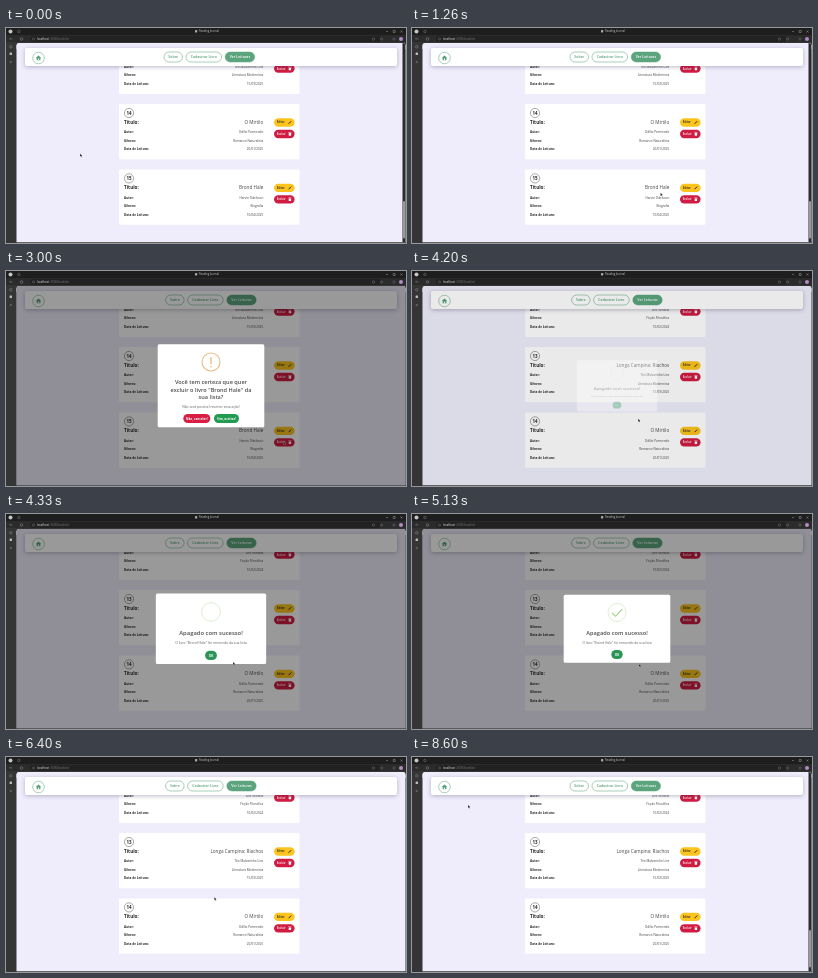
Write an HTML page with a canvas that moves like this. It is 400 px wide and 215 px high and loops after 8670 ms.

```html
<!DOCTYPE html>
<html lang="pt-BR">
<head>
<meta charset="utf-8">
<title>Reading Journal</title>
<style>
html, body { margin: 0; width: 100%; height: 100%; overflow: hidden; background: #1f1f1f; }
canvas { display: block; width: 400px; height: 215px; }
</style>
</head>
<body>
<canvas id="stage"></canvas>
<script>
const LOOP = 8670;
const canvas = document.getElementById('stage');
const ctx = canvas.getContext('2d');
const dpr = window.devicePixelRatio || 1;
canvas.width = 400 * dpr;
canvas.height = 215 * dpr;

const GREEN = '#519f74', RED = '#d01c43', INK = '#26262a', PAGE = '#efedfc';
const REMOVED = 'Brond Hale';
const BOOKS = [
  [12, 'A Colina', 'Ciro Ventolo', 'Ficção Filosófica', '10/02/2024'],
  [13, 'Longa Campina: Riachos', 'Téo Malvarinho Lins', 'Literatura Modernista', '15/03/2025'],
  [14, 'O Mirtilo', 'Odílio Parmendo', 'Romance Naturalista', '20/01/2025'],
  [15, REMOVED, 'Harvin Odelsson', 'Biografia', '10/04/2025']
];

// Event times in ms; the page scroll is locked from LOCK to RESTORED
const LOCK = 2400, ASK = 2440, ASK_END = 4010, DELETED = 4130, DONE = 4180, DONE_END = 6268, RESTORED = 7260;
// Pointer stops: time, x, y
const PATH = [
  [60, 74, 125.7], [800, 170, 150], [1500, 277.5, 170.3], [3050, 277.5, 170.3], [3900, 223, 147],
  [4330, 227, 148], [5100, 227, 150], [5930, 207, 140], [6330, 207.5, 140.5], [6400, 208.3, 140.2],
  [7260, 208.3, 140.2], [8130, 39, 31], [8600, 56, 48]
];

const clamp = v => Math.max(0, Math.min(1, v));
const progress = (t, start, length) => clamp((t - start) / length);
const mix = (a, b, p) => a + (b - a) * p;

function text(str, x, y, size, color, align = 'left', weight = 400) {
  ctx.save();
  ctx.translate(x, y + size * 0.36);
  ctx.scale(0.1, 0.1); // lay out large so glyph spacing stays fractional
  ctx.font = `${weight} ${size * 10}px "Open Sans", "Noto Sans", sans-serif`;
  ctx.textAlign = align;
  ctx.fillStyle = color;
  ctx.fillText(str, 0, 0);
  ctx.restore();
}

function box(x, y, w, h, r, fill, stroke, width = 0.7) {
  ctx.beginPath();
  ctx.roundRect(x, y, w, h, r);
  paint(fill, stroke, width);
}

function circle(x, y, r, fill, stroke, width = 0.7) {
  ctx.beginPath();
  ctx.arc(x, y, r, 0, 7);
  paint(fill, stroke, width);
}

function paint(fill, stroke, width) {
  if (fill) { ctx.fillStyle = fill; ctx.fill(); }
  if (stroke) { ctx.strokeStyle = stroke; ctx.lineWidth = width; ctx.stroke(); }
}

function line(points, color, width = 0.6) {
  ctx.beginPath();
  points.forEach(p => ctx.lineTo(...p));
  paint(null, color, width);
}

function shape(points, fill, stroke, width) {
  ctx.beginPath();
  points.forEach(p => ctx.lineTo(...p));
  ctx.closePath();
  paint(fill, stroke, width);
}

function shadow(color, blur, dy, draw) {
  ctx.save();
  ctx.shadowColor = color;
  ctx.shadowBlur = blur * dpr;
  ctx.shadowOffsetY = dy * dpr;
  draw();
  ctx.restore();
}

function viewport() {
  ctx.beginPath();
  ctx.roundRect(10.5, 15, 389, 199.3, [3, 3, 0, 0]);
}

function browser() {
  box(0, 0, 400, 215, 0, '#1e1e1e');
  box(0, 7, 400, 8, 0, '#2b2b2b');
  box(0, 14, 400, 201, 0, '#353535');
  box(24, 8, 351, 6, 3, '#222');
  circle(4.5, 3.5, 2, '#c5c5c5');
  box(11.8, 2.4, 2.2, 2.2, 0.5, null, '#999', 0.4);
  box(189, 2, 2.2, 2.4, 0.4, '#aaa');
  text('Reading Journal', 193, 3.3, 2.7, '#c8c8c8');
  line([[380, 3.5], [382, 3.5]], '#bbb', 0.4);
  box(387.2, 2.5, 2, 2, 0, null, '#bbb', 0.4);
  line([[394.5, 2.5], [396.5, 4.5]], '#bbb', 0.4);
  line([[396.5, 2.5], [394.5, 4.5]], '#bbb', 0.4);
  line([[6.5, 11], [3.5, 11], [4.8, 9.7]], '#aaa', 0.4);
  circle(15.5, 11, 1.3, null, '#aaa', 0.4);
  circle(27.5, 11, 1.1, null, '#888', 0.4);
  text('localhost', 31, 11, 2.9, '#e4e4e4');
  text(':3000/booklist', 43.8, 11, 2.9, '#777');
  circle(367.5, 11, 1.2, null, '#888', 0.4);
  box(374.5, 10, 2, 2, 0.5, null, '#888', 0.4);
  box(387, 10, 2, 2, 0.5, null, '#888', 0.4);
  circle(395, 11, 2, '#b38bc4');
  box(3.7, 17.7, 2.2, 2.2, 0.5, null, '#aaa', 0.4);
  box(3.6, 24.5, 2.4, 2.4, 0.5, '#bbb');
  line([[3.6, 34], [6, 34]], '#999', 0.4);
  line([[4.8, 32.8], [4.8, 35.2]], '#999', 0.4);
}

function pill(y, label, fill, ink) {
  box(268, y - 4.2, 20.6, 8.4, 4.2, fill);
  text(label, 270.8, y, 2.75, ink, 'left', 600);
}

function card(top, [number, title, author, genre, date], hover) {
  box(113, top, 180.5, 55.3, 1, '#fff');
  circle(123, top + 9, 4.6, '#fff', '#444', 0.45);
  text(number, 123, top + 9, 4.5, INK, 'center', 700);
  const rows = [['Título:', title, 18.4, 4.65], ['Autor:', author, 28, 3.1],
    ['Gênero:', genre, 36.4, 3.1], ['Data de Leitura:', date, 45, 3.1]];
  for (const [label, value, dy, size] of rows) {
    text(label, 118, top + dy, size, INK, 'left', 700);
    text(value, 257.3, top + dy, size, '#444', 'right');
  }
  const editY = top + 18.5, deleteY = top + 30;
  pill(editY, 'Editar', '#fcc41c', INK);
  line([[282.6, editY + 1.3], [285.2, editY - 1.3]], INK, 1);
  pill(deleteY, 'Excluir', hover ? '#981c35' : RED, '#fff');
  box(282.7, deleteY - 0.9, 2.4, 2.6, 0.4, '#fff');
  line([[282.2, deleteY - 1.6], [285.6, deleteY - 1.6]], '#fff', 0.5);
}

function navButton(x, w, label, active) {
  box(x, 24, w, 10, 5, active ? '#5ba47d' : '#fff', active ? '#5ba47d' : GREEN, 0.5);
  text(label, x + w / 2, 29, 3.55, active ? '#fff' : GREEN, 'center', 600);
}

function navbar(shift) {
  box(10, 15, 390, 6, 0, PAGE); // nothing scrolls past above the bar
  shadow('rgba(30,25,60,.3)', 4, 0.9, () => box(19, 20, 372, 18, 2, '#fff'));
  circle(32.5, 30, 5.8, '#fff', GREEN, 0.5);
  shape([[29.8, 30.1], [32.5, 27.6], [35.2, 30.1], [34.4, 30.1], [34.4, 32.3], [30.6, 32.3], [30.6, 30.1]], GREEN);
  box(31.9, 30.6, 1.2, 1.7, 0, '#fff');
  navButton(158 + shift, 18.5, 'Sobre');
  navButton(180 + shift, 35.6, 'Cadastrar Livro');
  navButton(219.2 + shift, 29.4, 'Ver Leituras', true);
}

function popScale(p) {
  if (p < 0.45) return mix(0.7, 1.05, p / 0.45);
  if (p < 0.8) return mix(1.05, 0.95, (p - 0.45) / 0.35);
  return mix(0.95, 1, (p - 0.8) / 0.2);
}

function modal(t, start, end, height, content) {
  if (t < start || t >= end + 130) return;
  const leaving = progress(t, end, 130);
  viewport();
  ctx.fillStyle = `rgba(0,0,0,${0.4 * progress(t, start, 100) * (1 - leaving)})`;
  ctx.fill();
  const scale = popScale(progress(t, start, 300)) * mix(1, 0.5, leaving);
  ctx.save();
  ctx.globalAlpha = progress(t, start, 60) * (1 - leaving);
  ctx.translate(205, 114.8);
  ctx.scale(scale, scale);
  ctx.translate(-205, -114.8);
  box(151.7, 114.8 - height / 2, 106.6, height, 1.5, '#fff');
  content();
  ctx.restore();
}

function modalButton(x, y, w, label, fill) {
  box(x - w / 2, y - 4.5, w, 9, 4.5, fill);
  text(label, x, y, 3.05, '#fff', 'center', 700);
}

function question() {
  circle(205, 91, 9, null, '#e9bd85', 1.1);
  line([[205, 86], [205, 93]], '#e9a95c', 1.1);
  circle(205, 95.7, 0.75, '#e9a95c');
  ['Você tem certeza que quer', `excluir o livro "${REMOVED}" da`, 'sua lista?']
    .forEach((s, i) => text(s, 205, 111 + i * 7.6, 5.6, '#4d4d50', 'center', 600));
  text('Não será possível reverter essa ação!', 205, 136, 3.35, '#606065', 'center');
  modalButton(190.8, 147.5, 27, 'Não, cancelar!', '#d91e43');
  modalButton(220.5, 147.5, 25, 'Sim, aceitar!', '#219a52');
}

function success(t) {
  circle(205, 98.5, 9, null, '#dcebcf', 0.9);
  const a = progress(t, DONE + 400, 120), b = progress(t, DONE + 510, 130);
  if (a > 0) {
    const tick = [[200, 98.8], [mix(200, 203.6, a), mix(98.8, 102.3, a)]];
    if (b > 0) tick.push([mix(203.6, 210.2, b), mix(102.3, 95.2, b)]);
    line(tick, '#9bd480', 1.1);
  }
  text('Apagado com sucesso!', 205, 118.5, 5.65, '#4d4d50', 'center', 600);
  text(`O livro "${REMOVED}" foi removido da sua lista`, 205, 128.7, 3.3, '#606065', 'center');
  modalButton(205, 140.5, 11.4, 'OK', t > 5900 ? '#1d7c43' : '#2b9556');
}

function pointerAt(t) {
  const i = PATH.findIndex(p => p[0] > t);
  if (i === 0) return PATH[0].slice(1);
  if (i < 0) return PATH[PATH.length - 1].slice(1);
  const [t0, x0, y0] = PATH[i - 1], [t1, x1, y1] = PATH[i];
  const p = (t - t0) / (t1 - t0), eased = p * p * (3 - 2 * p);
  return [mix(x0, x1, eased), mix(y0, y1, eased)];
}

function pointer(t, [x, y]) {
  const hand = (t > 1440 && t < ASK) || (t > 3820 && t < ASK_END) || (t > 5900 && t < DONE_END);
  ctx.save();
  ctx.translate(x, y);
  if (hand) {
    box(-0.4, 0, 0.9, 2.6, 0.4, '#222', '#bbb', 0.2);
    box(-1, 1.7, 2.9, 2.4, 0.8, '#222', '#bbb', 0.2);
  } else {
    shape([[0, 0], [0, 3.1], [0.8, 2.4], [1.3, 3.5], [1.9, 3.2], [1.4, 2.2], [2.3, 2.1]], '#111', '#fff', 0.2);
  }
  ctx.restore();
}

function draw(t) {
  ctx.setTransform(dpr, 0, 0, dpr, 0, 0);
  browser();
  const locked = t >= LOCK && t < RESTORED;
  const at = pointerAt(t);
  const hover = t < ASK && at[0] > 268 && at[1] > 166;

  ctx.save();
  viewport();
  ctx.clip();
  box(10, 15, 390, 200, 0, PAGE);
  const first = t < DELETED ? 1 : 0;
  for (let i = 0; i < 3; i++) card(10.6 + i * 65.4, BOOKS[first + i], hover && i === 2);
  navbar(locked ? 1.6 : 0);
  if (!locked) {
    box(396.5, 15, 3, 200, 0, '#2c2c2c');
    box(397, 173, 2, 37.5, 1, '#9a9a9a');
  }
  ctx.restore();

  modal(t, ASK, ASK_END, 83, question);
  modal(t, DONE, DONE_END, 68, () => success(t));
  pointer(t, at);
}

function tick() {
  draw(performance.now() % LOOP);
  requestAnimationFrame(tick);
}
tick();
</script>
</body>
</html>
```
